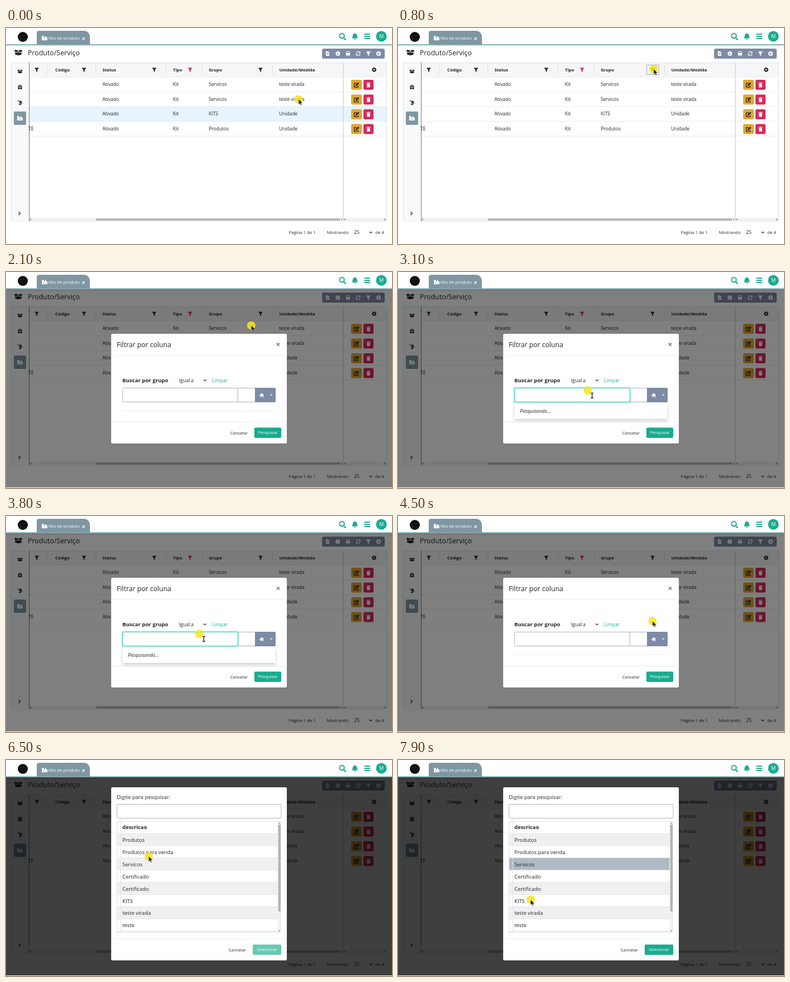
An HTML page for the animation above (8000 ms loop, 690 by 388 pixels).

```html
<!DOCTYPE html>
<html lang="pt">
<head>
<meta charset="utf-8">
<title>Filtrar por coluna</title>
<style>
html, body { margin: 0; width: 100%; height: 100%; overflow: hidden; background: #fff; }
svg { display: block; width: 690px; height: 388px; font-family: "Open Sans", "Noto Sans", sans-serif; }
</style>
</head>
<body>
<svg id="stage" viewBox="0 0 690 388" xmlns="http://www.w3.org/2000/svg"></svg>
<script>
const INK = '#212529', TEAL = '#1aab8f', SLATE = '#7d8ba4', TAB = '#7f97a2', RED = '#d62a5b', LINE = '#dee2e6';

const rect = (x, y, w, h, fill, extra = '') => `<rect x="${x}" y="${y}" width="${w}" height="${h}" fill="${fill}" ${extra}/>`;
const path = (d, fill, extra = '') => `<path d="${d}" fill="${fill}" ${extra}/>`;
const stroke = (d, color, width = 1, extra = '') => path(d, 'none', `stroke="${color}" stroke-width="${width}" ${extra}`);
const text = (x, middle, label, size = 8.4, extra = '', fill = INK) =>
  `<text x="${x}" y="${middle + size * .36}" font-size="${size}" fill="${fill}" ${extra}>${label}</text>`;
const bold = (x, middle, label, size = 7.7) => text(x, middle, label, size, 'font-weight="700"');
const group = (content, attrs) => `<g ${attrs}>${content}</g>`;
const at = (x, y, content, scale = 1) => group(content, `transform="translate(${x} ${y}) scale(${scale})"`);

const icons = {
  filter: c => path('M-3.8-3.5h7.6L1 .2V4L-1 2.6V.2z', c, `stroke="${c}" stroke-width=".4" stroke-linejoin="round"`),
  box: c => path('M-6-5L0-4-2-.6-8-2zM6-5L0-4 2-.6 8-2zM-6-.4L-1.6.6 0-2 1.6.6 6-.4V4L0 5.6-6 4z', c),
  gift: c => path('M-4-1.6h3.6V.6H-4zM.4-1.6H4V.6H.4zM-3.6 1.3h3.2V4h-3.2zM.4 1.3h3.2V4H.4z', c) +
    stroke('M0-1.8C-3-2-2.6-4-1.4-3.6S0-2 0-1.8 .2-3.2 1.4-3.6 3-2 0-1.8', c),
  dolly: c => stroke('M-4.5-3.5h2L.4 3 4.5 1.4', c) + path('M-1-2.6L2-3.8 3.6.2.7 1.4z', c) +
    `<circle cx="0" cy="3.3" r="1.4" fill="${c}"/>`,
  folder: c => path('M-5-4h3.5V-1h2V-3H3v2h2V4H-5z', c) + stroke('M-3 1.6h6', TAB, .7),
  exit: c => path('M-3-4H1L3-2V4H-3V1h3v1.6L2.2.4 0-1.8V-.2h-3z', c) + stroke('M-4.5.4h3', c),
  info: c => `<circle r="4" fill="${c}"/>` + stroke('M0-2.4v1.2M0-.4v3', SLATE, 1.3),
  print: c => stroke('M-2.5-1v-2.6h5V-1M-2.5 1.6v2h5v-2', c) + rect(-4, -1, 8, 3.2, c, 'rx="1"'),
  refresh: c => stroke('M-3.4-.5A3.4 3.4 0 0 1 2.8-2M3.4.5A3.4 3.4 0 0 1-2.8 2', c, 1.2) +
    path('M4-4v3.4H.8zM-4 4V.6h3.2z', c),
  plus: c => `<circle r="4" fill="${c}"/>` + stroke('M0-2.4v4.8M-2.4 0h4.8', SLATE, 1.2),
  edit: c => stroke('M1-3h-5v7h7V1.4', c, 1.2) + path('M3-4.6L4.9-2.7.4 1.8-2 2.3-1.5-.1z', c),
  trash: c => path('M-3.6-3.8h2.4l.5-.7H.7l.5.7h2.4v1.1h-7.2zM-3-2h6L2.6 4.3h-5.2z', c),
  gear: c => `<circle r="2.3" fill="none" stroke="${c}" stroke-width="1.8"/>` +
    `<circle r="3.5" fill="none" stroke="${c}" stroke-width="1.2" stroke-dasharray="1.5 1.25"/>`,
  eraser: c => path('M-4 .8L.6-3.4 4 .2 1.4 2.6H4v1H-2z', c) + stroke('M-2.4 1l2 1.6h1L2 1.3', SLATE, .8),
  close: c => stroke('M-2.6-2.6l5.2 5.2M2.6-2.6l-5.2 5.2', c, 1.2),
  down: c => stroke('M-2.4-1.2L0 1.2 2.4-1.2', c, 1.2)
};
const icon = (name, x, y, color = INK, scale = 1) => at(x, y, icons[name](color), scale);

const rowTop = i => 88 + i * 26.5;
const rows = [['Servicos', 'teste virada'], ['Servicos', 'teste virada'], ['KITS', 'Unidade'], ['Produtos', 'Unidade']];

function topBar() {
  return rect(0, 0, 690, 29, '#fff') + rect(0, 29, 690, 2, '#8fb3bd') +
    '<circle cx="30" cy="16" r="9" fill="#111"/>' +
    path('M55 30V9q0-4 4-4H138q12 0 12 13V30z', TAB) + icon('folder', 69, 18, '#fff') +
    text(76, 18, 'Kits de produto', 7.8, '', '#fff') + icon('close', 138.5, 19, '#fff', .9) +
    stroke('M603.5 17.5l4 4', TEAL, 2.4) + `<circle cx="600.5" cy="14" r="4.2" fill="none" stroke="${TEAL}" stroke-width="2"/>` +
    path('M618 18.5c2-2 1.4-4 2-6 .5-1.7 2-2.3 3-2.5V9h1.2v1c1 .2 2.5.8 3 2.5.6 2 0 4 2 6zM622 19.3h3.2a1.6 1.6 0 0 1-3.2 0z', TEAL) +
    stroke('M640.5 11h10.5M640.5 15h10.5M640.5 19h10.5', TEAL, 1.8) +
    `<circle cx="671" cy="15" r="9.6" fill="${TEAL}"/>` + text(671, 15, 'M', 9, 'text-anchor="middle"', '#fff');
}

function page() {
  const tools = ['exit', 'info', 'print', 'refresh', 'filter', 'plus'];
  const separators = [74, 160.5, 285.5, 350.5, 476.5].map(x => `M${x} 66v18`).join('');
  return icon('box', 22, 44, INK, .95) + text(39, 45, 'Produto/Serviço', 12.4) +
    rect(565, 37, 112, 18, SLATE, 'rx="3"') + tools.map((n, i) => icon(n, 575 + i * 18.2, 46, '#fff')).join('') +
    rect(9.5, 62.5, 671, 284.5, '#fff', `stroke="${LINE}"`) + rect(10, 63, 31, 284, '#f8f9fa') +
    rect(41, 63, 639, 25, '#f5f6f7') + '<g id="hover"></g>' +
    stroke([0, 1, 2, 3, 4].map(i => `M41 ${rowTop(i)}H680`).join(''), '#e3e6e9', .8) +
    stroke(separators, '#d5d8db', .8) +
    [['Código', 88], ['Status', 172.5], ['Tipo', 298.5], ['Grupo', 362.5], ['Unidade/Medida', 488.5]].map(([s, x]) => bold(x, 75, s)).join('') +
    '<g id="filterFocus">' + rect(444.5, 66.5, 22, 17, 'none', 'stroke="#9fb0bd"') + '</g>' +
    [55, 139.5, 265, 329, 455].map(x => icon('filter', x, 75, x === 329 ? RED : INK, .95)).join('') +
    icon('gear', 658, 75) +
    rows.map(([kind, unit], i) => {
      const y = 101.3 + i * 26.5;
      return text(172.5, y, 'Ativado') + text(298.5, y, 'Kit') + text(362.5, y, kind) + text(488, y, unit) +
        rect(617, y - 8.3, 19, 18, '#e3a62b', 'rx="2.5"') + icon('edit', 626.5, y + 1) +
        rect(639, y - 8.3, 18, 18, RED, 'rx="2.5"') + icon('trash', 648, y + 1, '#fff');
    }).join('') + text(40, 180.8, 'TE') +
    rect(41, 341, 639, 6, '#f1f1f1') + rect(161, 342, 436, 4, '#b9b9b9') +
    path('M45 342.3v3.4l-2.4-1.7zM599 342.3v3.4l2.4-1.7zM607 342.3v3.4l-2.4-1.7zM676.500 342.300v3.4l2.4-1.7z', '#777') +
    stroke('M41.5 62V347', '#777') + stroke('M603 62V347', '#c3c7ca') +
    icon('box', 25, 78, INK, .62) + icon('gift', 25, 106) + icon('dolly', 25, 134) +
    rect(14, 150, 22, 24, TAB, 'rx="2"') + icon('folder', 25, 162, '#fff') +
    stroke('M22.500 330l3 3-3 3', INK, 1.3) +
    text(505.5, 367, 'Página 1 de 1', 7.7) + text(573.5, 367.5, 'Mostrando', 7.6) + text(622, 367, '25', 8.8) +
    icon('down', 652, 367) + text(660, 367.5, 'de 4', 8);
}

function dialog(top, height, content) {
  return rect(188, top, 314, height, '#fff', 'rx="2.5"') + content;
}
const button = (x, y, w, label) => rect(x, y, w, 18.5, TEAL, 'rx="2"') +
  text(x + w / 2, y + 9.2, label, 7.6, 'text-anchor="middle"', '#fff');

function filterDialog() {
  return dialog(111, 197,
    text(198, 131, 'Filtrar por coluna', 12.2) + icon('close', 486.5, 130, '#555') +
    stroke('M188 150H502M188 269.5H502M208 249H483', '#e6e9ec', .8) +
    bold(208, 195, 'Buscar por grupo', 9.6) + text(309, 194.5, 'Igual a', 8.6) + icon('down', 355.5, 194.5) +
    text(368.5, 194.5, 'Limpar', 8.4, '', TEAL) +
    rect(208.5, 208.5, 273, 25, '#fff', 'rx="2" stroke="#a9b2bf"') + stroke('M414.5 208.5v25', '#a9b2bf') +
    path('M445 208h35q2 0 2 2v22q0 2-2 2h-35z', SLATE) + icon('eraser', 457, 221, '#fff') +
    path('M472 219.800h4.6l-2.3 2.600z', '#fff') +
    text(401, 289, 'Cancelar', 7.7) + button(444, 279.5, 48, 'Pesquisar') +
    '<g id="focus">' + rect(207.500, 207.5, 208, 27, 'none', 'rx="2" stroke="#a6f2e4" stroke-width="2"') +
    rect(208.5, 208.5, 206, 25, 'none', 'rx="1.5" stroke="#45cdb9"') + '</g>' +
    '<g id="results">' + rect(208.5, 235, 273, 29, '#fff', 'filter="url(#soft)"') +
    text(218, 249.5, 'Pesquisando...', 8.7, 'font-style="italic"') + '</g>');
}

function searchDialog() {
  const items = ['Produtos', 'Produtos para venda', 'Servicos', 'Certificado', 'Certificado', 'KITS', 'teste virada', 'teste'];
  const itemTop = i => 132 + i * 21.9;
  return dialog(49, 311,
    text(198, 67, 'Digite para pesquisar:', 9.4) + rect(198.5, 79.5, 293.500, 25, '#fff', 'rx="2" stroke="#a9b2bf"') +
    [0, 2, 4, 6].map(i => rect(198, itemTop(i), 287.5, 21.9, '#f0f0f1')).join('') + rect(198, 307.2, 287.5, 3, '#f0f0f1') +
    rect(198, itemTop(2), 287.5, 21.9, '#b0b9c3', 'id="picked"') +
    stroke([0, 1, 2, 3, 4, 5, 6, 7, 8].map(i => `M198 ${itemTop(i)}H485.500`).join(''), LINE, .8) +
    stroke('M205 110V310M198.500 110V310M198 110.5H492M198 310H492', LINE, .9) +
    bold(208, 121, 'descricao', 9.3) + items.map((s, i) => text(208, itemTop(i) + 11.7, s, 9.4)).join('') +
    rect(485.5, 110.5, 6.5, 199.5, '#f1f1f1') + rect(486.5, 116, 4.500, 156, '#b5b5b5') +
    path('M487.2 114.200h3.200l-1.6-2zM487.2 306.200h3.200l-1.6 2z', '#666') +
    stroke('M188 321H502', '#e6e9ec', .8) + text(398, 341, 'Cancelar', 7.7) +
    group(button(441, 331.5, 51, 'Selecionar'), 'id="confirm"'));
}

const byId = id => document.getElementById(id);
byId('stage').innerHTML =
  `<defs><filter id="soft" x="-10%" y="-30%" width="120%" height="190%"><feDropShadow dx="0" dy="3" stdDeviation="3" flood-opacity=".2"/></filter>
  <linearGradient id="fall" x2="0" y2="1"><stop stop-color="#000" stop-opacity=".1"/><stop offset="1" stop-opacity="0"/></linearGradient></defs>` +
  rect(0, 0, 690, 388, '#fff') + page() + rect(0, 31, 690, 4, 'url(#fall)') +
  rect(0, 29, 690, 358, '#000', 'id="dim1"') + group(filterDialog(), 'id="filterDialog"') +
  rect(0, 31, 690, 356, '#000', 'id="dim2"') + group(searchDialog(), 'id="searchDialog"') + topBar() +
  group('<circle r="7.5" fill="#f7e51c" opacity=".85"/>' +
    group(path('M0 0V9.5L2.300 7.500 3.900 11 5.500 10.300 4 7H7.300z', '#222', 'stroke="#fff" stroke-width=".4"'), 'id="arrow"') +
    group(stroke('M5.500 4.500h5M8 4.500v9M5.500 13.500h5', '#333', 1.5), 'id="beam"'), 'id="cursor"');

// time, x, y of the pointer
const stops = [
  [100, 523, 128], [800, 457, 74], [1900, 457, 74], [2700, 339, 213], [3700, 339, 213], [4400, 455, 189],
  [4600, 455, 189], [4950, 474, 221], [5100, 474, 221], [5400, 466, 248], [5700, 466, 248], [6400, 255, 173],
  [6550, 255, 173], [6750, 244, 187], [7150, 244, 187], [7850, 237, 251]
];
const clamp = v => Math.max(0, Math.min(1, v));
const easeOut = p => 1 - (1 - p) ** 2;

function pointer(t) {
  const i = stops.findIndex(s => s[0] > t);
  if (i === 0) return stops[0].slice(1);
  if (i < 0) return stops[stops.length - 1].slice(1);
  const [t0, x0, y0] = stops[i - 1], [t1, x1, y1] = stops[i];
  const p = (t - t0) / (t1 - t0), k = p * p * (3 - 2 * p);
  return [x0 + (x1 - x0) * k, y0 + (y1 - y0) * k];
}

const set = (id, name, value) => byId(id).setAttribute(name, value);
const show = (id, on) => set(id, 'display', on ? 'inline' : 'none');

function openDialog(dialogId, dimId, p, opacity) {
  set(dialogId, 'transform', `translate(0 ${-50 * (1 - easeOut(p))})`);
  set(dialogId, 'opacity', opacity);
  set(dimId, 'opacity', .5 * clamp(p * 2));
}

function render(t) {
  const [x, y] = pointer(t);
  const first = clamp((t - 920) / 300), second = clamp((t - 5600) / 300);
  const overInput = t > 2000 && t < 5600 && x > 208 && x < 414 && y > 206 && y < 234;
  const hovered = t < 100 ? 2 : Math.floor((y - 88) / 26.5);

  byId('hover').innerHTML = t < 920 && hovered >= 0 ? rect(42, rowTop(hovered), 638, 26.5, '#e8f4fc') : '';
  show('filterFocus', t >= 700 && t < 1900);
  openDialog('filterDialog', 'dim1', first, clamp(first * 2));
  openDialog('searchDialog', 'dim2', second, second);
  show('focus', t >= 2800 && t < 3900);
  show('results', t >= 2900 && t < 3900);
  show('picked', t >= 6800);
  set('confirm', 'opacity', t >= 6800 ? 1 : .65);
  set('cursor', 'transform', `translate(${x} ${y})`);
  show('arrow', !overInput);
  show('beam', overInput);
}

const start = performance.now();
function tick() {
  render((performance.now() - start) % 8000);
  requestAnimationFrame(tick);
}
tick();
</script>
</body>
</html>
```
